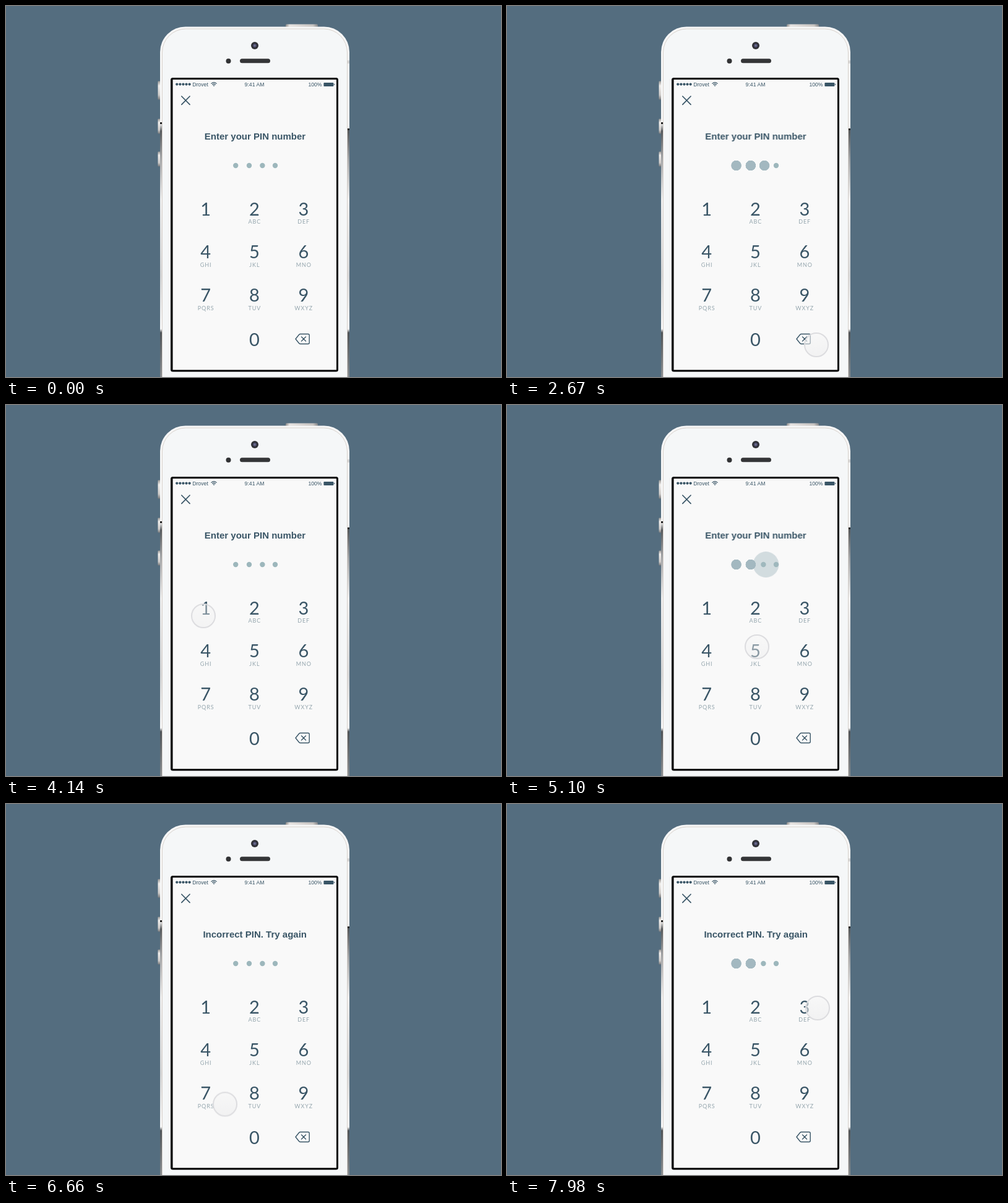
Recreate the animation shown at these times as an HTML page. Size 800 by 600 pixels, loop 8000 ms.

```html
<!DOCTYPE html>
<html lang="en">
<head>
<meta charset="utf-8">
<title>PIN entry</title>
<style>
html, body { margin: 0; width: 100%; height: 100%; overflow: hidden; background: #546d7f; }
svg { display: block; width: 800px; height: 600px; }
text { text-anchor: middle; fill: #395566; }
.status { font: 8.7px "Liberation Sans", Arial, sans-serif; }
.title { font: bold 15px "Liberation Sans", Arial, sans-serif; }
.digit { font: 29px Lato, "Open Sans", sans-serif; }
.letters { font: 9px Lato, "Open Sans", sans-serif; letter-spacing: .9px; fill: #95a6ae; }
.line { fill: none; stroke: #395566; stroke-linecap: round; stroke-linejoin: round; }
#retry, .fill, #cursor { opacity: 0; }
</style>
</head>
<body>
<svg viewBox="0 0 800 600">
  <defs>
    <linearGradient id="metal" x2="0" y2="1">
      <stop offset="0" stop-color="#9c9a98"/><stop offset=".25" stop-color="#f1efed"/>
      <stop offset=".75" stop-color="#cfccca"/><stop offset="1" stop-color="#77797b"/>
    </linearGradient>
    <linearGradient id="cap">
      <stop offset="0" stop-color="#8d8b89"/><stop offset=".12" stop-color="#e6e3e1"/>
      <stop offset=".85" stop-color="#c9c5c2"/><stop offset="1" stop-color="#85878a"/>
    </linearGradient>
    <linearGradient id="edge" gradientUnits="userSpaceOnUse" x1="0" y1="190" x2="0" y2="600">
      <stop offset="0" stop-color="#f4f4f4"/><stop offset=".03" stop-color="#55595c"/>
      <stop offset=".14" stop-color="#a4a6a8"/><stop offset=".3" stop-color="#f0f0f0"/>
      <stop offset=".6" stop-color="#d5d6d7"/><stop offset=".81" stop-color="#fafafa"/>
      <stop offset=".825" stop-color="#4f5458"/><stop offset="1" stop-color="#8a8e91"/>
    </linearGradient>
    <linearGradient id="touch" x2="0" y2="1">
      <stop offset="0" stop-color="#f6f6f6"/><stop offset="1" stop-color="#ebebec"/>
    </linearGradient>
    <radialGradient id="lens">
      <stop offset="0" stop-color="#7d7fa8"/><stop offset=".4" stop-color="#4a4a66"/>
      <stop offset=".65" stop-color="#2c2c33"/><stop offset="1" stop-color="#37383b"/>
    </radialGradient>
  </defs>

  <rect width="800" height="600" fill="#546d7f"/>
  <rect x="452" y="29.5" width="52" height="6" rx="1.5" fill="url(#cap)"/>
  <g fill="url(#metal)">
    <rect x="245.5" y="121.5" width="5" height="30" rx="1"/>
    <rect x="245.5" y="182.5" width="5" height="24" rx="1"/>
    <rect x="245.5" y="235.5" width="5" height="24" rx="1"/>
  </g>
  <rect x="249" y="33.5" width="306" height="640" rx="41" fill="#f7f7f7"/>
  <path d="M249 190h4v410h-4zM551 200h4v400h-4z" fill="url(#edge)"/>
  <path d="M249 188h3v3h-3zM552 198h3v3h-3z" fill="#222"/>
  <path d="M552 88h3v5h-3z" fill="#d3d3d3"/>
  <rect x="252.5" y="37" width="299" height="640" rx="38" fill="#f5f7f8" stroke="#d9d2cc"/>

  <circle cx="402" cy="64" r="6" fill="url(#lens)"/>
  <circle cx="359.5" cy="89" r="4" fill="#313234"/>
  <rect x="378" y="85.3" width="49" height="7" rx="3.5" fill="#343537"/>
  <rect x="267.5" y="117.5" width="268" height="472.5" rx="2" fill="#f9f9f9" stroke="#000" stroke-width="3"/>
  <path d="M268.5 118v471" stroke="#000" stroke-width="2"/>

  <g class="status">
    <g fill="#395566" id="signal"></g>
    <text x="314" y="130">Drovet</text>
    <text x="401.5" y="130">9:41 AM</text>
    <text x="499.5" y="130">100%</text>
    <path class="line" stroke-width="1.2" d="M331.8 125.4q4.2-3.6 8.4 0M333.6 127.2q2.4-2 4.8 0"/>
    <circle cx="336" cy="128.8" r="1" fill="#395566"/>
    <rect x="513.4" y="123.9" width="16" height="6" rx="1" fill="#395566"/>
    <path d="M530 125.7h.9v2.4h-.9z" fill="#395566"/>
  </g>
  <path class="line" stroke-width="1.7" d="M283.8 146l13.2 13.4M297 146l-13.2 13.4"/>

  <text class="title" id="prompt" x="402.5" y="216">Enter your PIN number</text>
  <text class="title" id="retry" x="402.2" y="216">Incorrect PIN. Try again</text>

  <g id="dots"></g>
  <g id="keys"></g>
  <path class="line" stroke-width="1.4" d="M468 538.5l5.6-7q.9-1 2.2-1h12.4q2 0 2 2v12q0 2-2 2h-12.4q-1.300 0-2.200-1zM477.500 535l7 7M484.500 535l-7 7"/>

  <g id="cursor"><g id="press">
    <circle id="glass" r="19" fill="url(#touch)" fill-opacity=".58"/>
    <circle r="19" fill="none" stroke="#dcdcdf" stroke-width="2"/>
  </g></g>
</svg>

<script>
const LOOP = 8000;
const $ = id => document.getElementById(id);
const sheet = document.createElement("style");
document.head.append(sheet);

// frames: [ms, declarations, easing to the next frame]
function animate(id, frames, ease = "linear") {
  const last = frames[frames.length - 1];
  const all = last[0] < LOOP ? [...frames, [LOOP, last[1]]] : frames;
  const body = all.map(([ms, rule, e]) =>
    `${(ms / LOOP * 100).toFixed(4)}%{${rule};animation-timing-function:${e || ease}}`).join("");
  sheet.textContent += `@keyframes ${id}{${body}}#${id}{animation:${id} ${LOOP}ms infinite}`;
}

const at = (x, y) => `transform:translate(${x}px,${y}px)`;

$("signal").innerHTML = [0, 1, 2, 3, 4].map(i =>
  `<circle cx="${276.2 + i * 5.1}" cy="126.600" r="2.150"/>`).join("");

const letters = ["", "ABC", "DEF", "GHI", "JKL", "MNO", "PQRS", "TUV", "WXYZ"];
const columns = [322.7, 401.5, 480.8], rows = [339, 408, 478];
$("keys").innerHTML = letters.map((word, i) => {
  const x = columns[i % 3], y = rows[i / 3 | 0];
  const base = 352 + 70 * (i / 3 | 0);
  return `<text class="digit" x="${x}" y="${y}">${i + 1}</text>
    <text class="letters" x="${x + .4}" y="${base}">${word}</text>`;
}).join("") + `<text class="digit" x="401.5" y="549.500">0</text>`;

// x, offset of the filled dot, start size, burst shift, pop times, delete time
const dots = [
  { x: 371.2, off: -.7, size: 2.15, shift: -19, pops: [1395, 4260, 7380], del: 3360 },
  { x: 393, off: .8, size: 3, shift: -11, pops: [1780, 4630, 7620], del: 3190 },
  { x: 414.4, off: 1.6, size: 3, shift: -1, pops: [2250, 5040], del: 3030 },
  { x: 435, off: 2.4, size: 3, shift: 10, pops: [5520] }
];
$("dots").innerHTML = dots.map(d => `<circle cx="${d.x}" cy="258" r="4.200" fill="#9db7bc"/>`).join("") +
  dots.map((d, i) => `<g transform="translate(${d.x} 258)"><g class="fill" id="dot${i}">
    <circle cx="${d.off}" r="8.300" fill="#a3b8c0"/></g></g>`).join("");

dots.forEach((d, i) => {
  const look = (scale, alpha, x = 0) =>
    `transform:translate(${x}px,0) scale(${scale});opacity:${alpha}`;
  const frames = [[0, look(d.size, 0)]];
  for (const t of d.pops)
    frames.push([t - .5, look(d.size, 0)], [t, look(d.size, .28)], [t + 250, look(1, 1)]);
  if (d.del)
    frames.push([d.del, look(1, 1)], [d.del + 110, look(.5, 0)]);
  frames.push([6210, look(1, 1)], [6480, look(3, 0, d.shift)]);
  animate("dot" + i, frames.sort((a, b) => a[0] - b[0]));
});

animate("prompt", [
  [0, at(0, 0) + ";opacity:1"], [2040, at(-.5, 0) + ";opacity:1"],
  [3195, at(0, 0) + ";opacity:1"], [4890, at(-.5, 0) + ";opacity:1"],
  [5790, at(0, 0) + ";opacity:0"]
], "step-end");
animate("retry", [[0, "opacity:0"], [5790, "opacity:1"]], "step-end");

const into = "ease-in", out = "ease-out";
const path = [
  [0, 503, 332], [630, 503, 332, into], [980, 415, 290, out],
  [1290, 327, 332], [1380, 327, 332], [1650, 403, 331.5], [1740, 403, 331.5],
  [2160, 476, 338], [2250, 477, 338], [2520, 488, 568], [2670, 500, 548],
  [2760, 500, 548], [2940, 481, 545], [3400, 481, 545], [3810, 321, 344],
  [3980, 317, 342], [4140, 319, 341], [4230, 319, 341], [4560, 320, 387],
  [4650, 321, 392, into], [4800, 350, 414, out], [5010, 404, 391], [5130, 404, 391],
  [5370, 488, 398, into], [5460, 465, 404, "linear"], [5820, 322, 475, out],
  [6000, 354, 485.5], [6660, 354, 485.5], [7110, 327, 340], [7200, 327, 340],
  [7440, 394, 331], [7590, 400, 331], [7970, 502, 330]
];
animate("cursor", path.map(([ms, x, y, e]) =>
  [ms, at(x, y) + `;opacity:${ms < 600 ? 0 : 1}`, e]).flatMap((f, i) =>
  i ? [f] : [f, [599, at(503, 332) + ";opacity:0"]]), "ease-in-out");

const taps = [1320, 1680, 2220, 3010, 3170, 3340, 4190, 4590, 5040, 5370, 7150, 7540];
const size = s => `transform:scale(${s})`;
animate("press", [[0, size(1)], ...taps.flatMap(t =>
  [[t - 60, size(1)], [t, size(.95)], [t + 50, size(1)]])], "ease-in-out");
animate("glass", [
  [0, "fill-opacity:.58"], [3950, "fill-opacity:.58"], [4140, "fill-opacity:.38"],
  [4300, "fill-opacity:.5"], [5100, "fill-opacity:.45"], [5400, "fill-opacity:.58"]
]);
</script>
</body>
</html>
```
